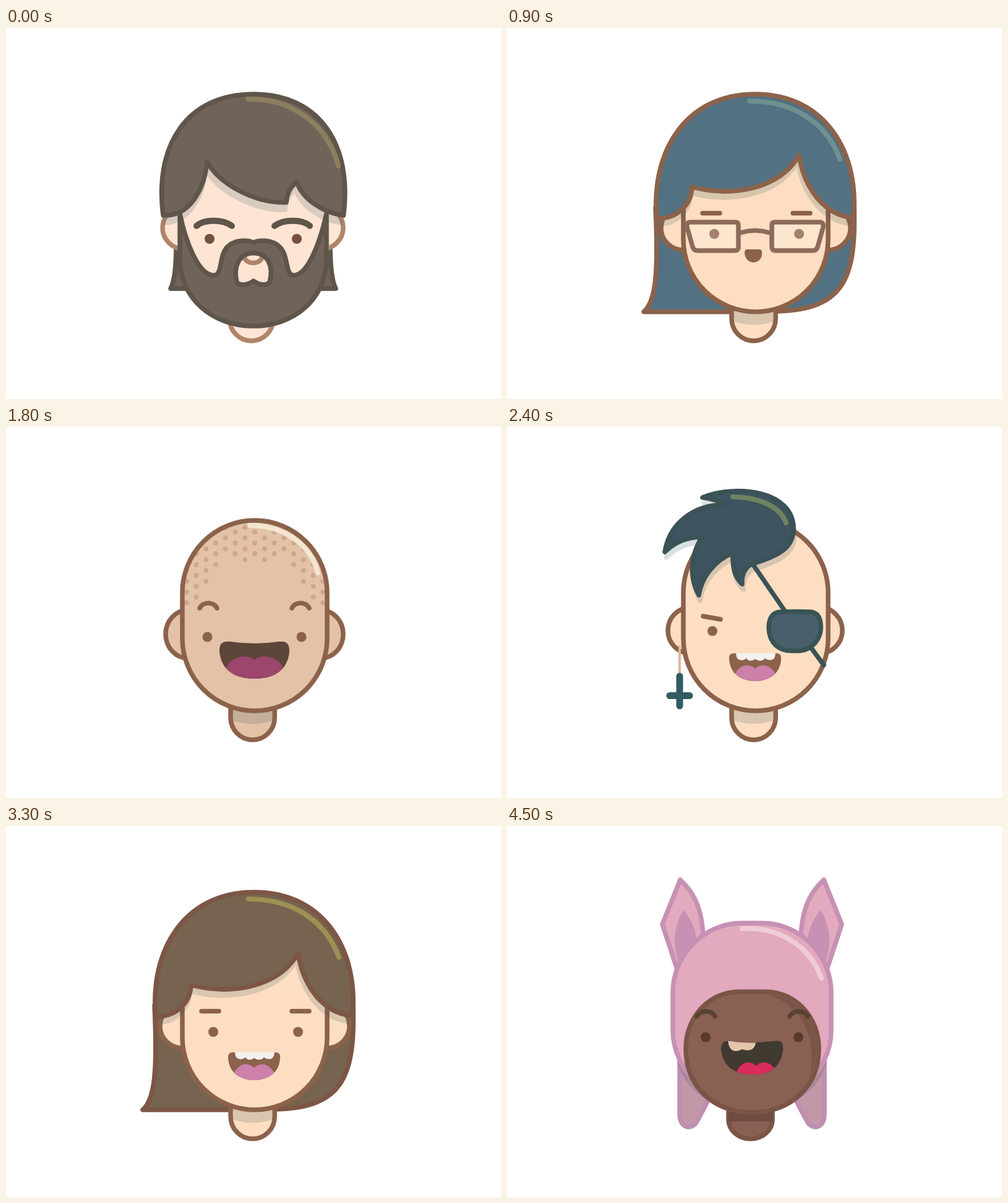
These frames come from a looping animation (800x600 px, 4800 ms). An HTML page:

```html
<!DOCTYPE html>
<html lang="en">
<head>
<meta charset="utf-8">
<title>Faces</title>
<style>
html, body { margin: 0; width: 100%; height: 100%; overflow: hidden; background: #fff; }
svg { display: block; width: 100%; height: 100%; }
</style>
</head>
<body>
<svg id="stage" viewBox="0 0 800 600" stroke-linecap="round" stroke-linejoin="round"></svg>
<script>
const STEP = 300, WEIGHT = 7.5;
const BROWN = '#8c624a', PINE = '#3a5355';

const path = (d, fill = 'none', line = 'none', w = WEIGHT) =>
  `<path d="${d}" fill="${fill}" stroke="${line}" stroke-width="${w}"/>`;
const line = (d, color, w = WEIGHT) => path(d, 'none', color, w);
const dot = (x, y, r, fill) => `<circle cx="${x}" cy="${y}" r="${r}" fill="${fill}"/>`;
const eyes = (x1, x2, y, fill = BROWN) => dot(x1, y, 8, fill) + dot(x2, y, 8, fill);
const move = (transform, art) => `<g transform="${transform}">${art}</g>`;
const clip = (id, art) => `<g clip-path="url(#${id})">${art}</g>`;
const both = (axis, art) => art + move(`matrix(-1 0 0 1 ${2 * axis} 0)`, art);
const shade = (d, x = 0, y = 0, w = 0) =>
  `<path d="${d}" transform="translate(${x} ${y})" fill="#345a5c" stroke="#345a5c" stroke-width="${w}" opacity=".18"/>`;

const HEAD = 'M285 268A117 117 0 0 1 519 268V342A117 117 0 0 1 285 342Z';
const PALE = { skin: '#fddec2', line: BROWN, ears: [256, 546, 288, 370] };
const TAN = { skin: '#e3c2a8', line: BROWN, ears: [254, 549, 292, 378] };
const ROSY = { skin: '#fee4d3', line: '#b08468', ears: [249, 549, 284, 362], neckX: -2 };

const earShapes = ([l, r, t, b]) => [l + 40, r - 40].map(x =>
  `<ellipse cx="${x}" cy="${(t + b) / 2}" rx="36" ry="${(b - t) / 2 - 4}"/>`).join('');

function base({ skin, line, ears, headX = 0, neckX = 0 }, outline = line) {
  return `<g fill="${skin}" stroke="${line}" stroke-width="${WEIGHT}">${earShapes(ears)}</g>` +
    move(`translate(${neckX})`, path('M363 450V470A35.600 36 0 0 0 434.200 470V450', skin, line) +
      shade('M366.700 452H430.500V475Q399 485 366.700 475Z')) +
    move(`translate(${headX})`, path(HEAD, skin, outline));
}

// Clips the hair shadow to the head and ears.
let clips = 0;
function onSkin({ ears }, art) {
  const id = 'skin' + clips++;
  return `<clipPath id="${id}"><path d="${HEAD}"/>${earShapes(ears)}</clipPath>` + clip(id, art);
}

function hair(face, style, { fill, line, shine }, transform = '') {
  return onSkin(face, move(transform, shade(style.d, -2, style.drop, WEIGHT))) +
    move(transform, path(style.d, fill, line) + path(style.shine, 'none', shine, 8));
}

const UMBER = { fill: '#70635a', line: '#5f554a', shine: '#8b7f5f' };
const BLUE = { fill: '#527182', line: BROWN, shine: '#6e9090' };
const SLATE = { fill: '#465e6b', line: PINE, shine: '#62796a' };
const OLIVE = { fill: '#766350', line: '#7d5645', shine: '#9c9152' };

const SHAG = {
  d: 'M254 303C239 190 292 107 400 107C508 107 560 190 545.500 303C515 299 480 279 470 249C459 257 454 268 453 282C405 284 345 254 325 216C320 265 295 305 254 303Z',
  shine: 'M391 115C460 113 520 155 537 223', drop: 12
};
const BOB = {
  d: 'M242 308C232 205 285 107 401 107C517 107 570 205 560 307C512 303 480 258 472 206C440 262 360 274 299 257C298 286 275 309 242 308Z',
  shine: 'M392 118C460 118 515 150 538 212', drop: 10
};
const QUIFF = {
  d: 'M299 160C305 125 345 107 400 107C480 107 519 130 519 190C519 240 520 270 544 282C510 292 460 285 428 257C423 268 421 278 425 288C375 290 320 275 289 250C262 230 262 166 299 160Z',
  shine: 'M390 115C470 115 510 130 510 197', drop: 11
};
const BOB_BACK = 'M240 290C245 400 240 442 221 459H400L440 458C540 454 565 410 561 290Z';
const LONG = 'M237 250C237 169 302 103 382 103H408C488 103 553 169 553 250C553 350 555 420 573 459';

const mouths = `<clipPath id="grin"><path d="M345 364C345 352 347 346 362 347Q402 353 441 347C456 346 458 352 458 364C455 392 435 407 402 407C368 407 348 392 345 364Z"/></clipPath>
<clipPath id="bite"><path d="M359 373Q359 366 367 366H435Q443 366 443 373C443 400 422 411 401 411C380 411 359 400 359 373Z"/></clipPath>
<clipPath id="gap"><path d="M346 362C346 350 350 347 362 348C390 353 415 349 432 348C444 346 447 352 446 362C443 390 425 402 397 402C370 402 349 390 346 362Z"/></clipPath>
<clipPath id="skull"><path d="${HEAD}"/></clipPath>`;

const tongue = (x1, x2, y, fill) => {
  const m = (x1 + x2) / 2;
  return path(`M${x1} ${y}C${x1 + 8} ${y - 22} ${m - 10} ${y - 24} ${m} ${y - 14}C${m + 10} ${y - 24} ${x2 - 8} ${y - 22} ${x2} ${y}V415H${x1}Z`, fill);
};
const fillMouth = fill => `<rect x="340" y="340" width="125" height="75" fill="${fill}"/>`;

const laugh = () => clip('grin', fillMouth('#5e453a') + tongue(355, 448, 391, '#9c456d'));
const bite = () => clip('bite', fillMouth(BROWN) + tongue(366, 436, 405, '#cd80aa') +
  path('M370 364H434Q434 377 426 377Q420 377 417 374Q414 378 409 378Q404 378 401.500 375Q398 378 394 378Q389 378 387 374Q383 378 378 377Q370 377 370 364Z', '#f4f1f0'));
const smile = () => line('M373 381C376 399 415 399 418 381', BROWN);
const pout = () => path('M384 363Q384 358 389 358H407Q412 358 412 363C413 372 407 379 398 379C390 379 384 372 384 363Z', BROWN);
const arches = () => line('M313 293C318 282 336 282 341 293M462 293C467 282 485 282 490 293', BROWN);
const dashes = () => line('M316 299.500H344M462 299.500H490', BROWN);

function moustache({ fill, line }) {
  const d = 'M399 388C385 402 345 400 321 377C350 380 355 358 380 358C393 358 400 370 399 388Z';
  return both(398.5, shade(d, 0, 7, WEIGHT)) + both(398.5, path(d, fill, line));
}

const boxGlasses = () => both(401, path('M296 314H369Q374 314 374 319V354Q374 360 368 360H308Q302 360 300 354L291 322Q290 314 296 314Z', 'rgba(255,255,255,.2)', '#8c6a5c')) +
  line('M378 331Q401 324 424 331', '#8c6a5c');

function roundGlasses() {
  const lens = 'M289 330C289 318 300 314 330 314C360 314 374 320 373 335C370 360 352 382 318 382C292 382 289 355 289 330Z';
  const half = 'M397 317C375 317 365 307 335 305Q300 303 267 311V322Q274 326 275 332C278 360 284 390 324 391C359 391 371 375 381 350C386 335 389 331 397 331Z';
  return both(397, path(lens, 'rgba(255,255,255,.2)') +
    `<path d="${half}${lens}" fill="#3d464a" fill-rule="evenodd"/>` +
    '<ellipse cx="276" cy="318" rx="5.500" ry="2" fill="#f4f4f4"/>');
}

function bearded() {
  const { fill, line: dark } = UMBER;
  const hole = 'M373 411C367 385 377 364 400 364C423 364 433 385 426 411C421 418 408 415 400 409C392 415 378 418 373 411Z';
  return both(399.5, path('M275 350C275 390 272 410 266 421.500H310V350Z', fill, dark)) +
    base(ROSY, ROSY.skin) +
    path('M281 300V370C281 440 335 482 400 482C465 482 518 440 518 370V300C508 345 488 400 465 400C450 400 458 365 440 352C430 343 410 342 400 347C390 342 370 343 360 352C343 365 351 400 336 400C311 400 290 345 281 300Z', fill, dark) +
    path(hole, ROSY.skin) + line('M385 371A15 12 0 0 0 414 371', ROSY.line) + line(hole, dark) +
    hair(ROSY, SHAG, UMBER) +
    line('M308 320C320 309 350 309 365 320M434 320C449 309 479 309 491 320', dark, 10) +
    eyes(329, 470, 341, '#75503e');
}

function bobbed(tone, colors, transform, features) {
  const face = { ...tone, ears: [245, 559, 284, 363] };
  return move(transform, path(BOB_BACK, colors.fill, colors.line)) + base(face) +
    hair(face, BOB, colors, transform) + features;
}

function shaved() {
  const last = [2, 3, 2, 2, 3, 5, 6, 7];
  let stubble = '';
  for (let k = -7; k <= 7; k++)
    for (let n = 0; n <= last[Math.abs(k)]; n++)
      stubble += dot(402 + 15.75 * k, (k % 2 ? 162 : 170) + 17.5 * n, 4, '#cfa78f');
  return base(TAN, 'none') + clip('skull', stubble) + line(HEAD, BROWN) +
    line('M394 159C450 160 493 190 504 236', '#f3e6d0', 8) +
    arches() + eyes(325.5, 477.5, 339.5) + laugh();
}

function pirate() {
  const locks = 'M316 114C370 92 464 103 463 165C463 195 440 208 398 221C384 226 379 240 380 254C370 245 364 232 365 204C335 215 314 245 310 272C298 250 292 215 315 178C290 178 272 186 255 202C262 158 300 125 352 126Q336 116 316 114Z';
  return base(PALE) + shade(locks, 2, 9, WEIGHT) +
    line('M398 223L448 296M490 355L512 385', PINE) +
    path(locks, '#3e5460', '#3b5256') +
    line('M365 113C400 113 440 125 451 155', '#6f835f', 8) +
    path('M443 299Q467 298 490 299C503 300 508 310 507 328C504 352 485 362 470 362H460C440 362 424 350 423 325C423 308 430 299 443 299Z', '#485f6c', PINE) +
    line('M317 306L345 311', BROWN) + dot(332, 330, 8, BROWN) + bite() +
    line('M279 355V400', '#e0b79a', 4) + line('M279 403V451M263 434.500H295', '#315c60', 11);
}

function fringed() {
  const face = { ...PALE, ears: [285, 505, 300, 350], headX: -5, neckX: -1 };
  return path(LONG + 'H218C235 420 237 350 237 250Z', '#3a5252', PINE) + base(face) +
    shade('M288 264H502.500V278H288Z') +
    path(LONG + 'C535 445 512 390 509 330L502.500 264H288L283 330C278 395 258 445 218 459C235 420 237 350 237 250Z', SLATE.fill, PINE) +
    line('M387 115C455 113 515 150 535 207', SLATE.shine, 8) +
    line('M307 291C314 282 325 280 335 284M457 284C467 280 477 282 484 291', BROWN) +
    eyes(335.5, 455.5, 341) + smile() + roundGlasses();
}

function dapper() {
  const face = { ...TAN, ears: [247, 555, 292, 377] };
  return base(face) + hair(face, QUIFF, OLIVE) +
    line('M310 326H362M440 326H491', BROWN) + eyes(325.5, 476.5, 338) +
    moustache(OLIVE) + line('M386 405C390 416 409 416 414 405', BROWN);
}

function hooded() {
  const pink = '#e3a9be', rim = '#c791b4', skin = '#8a6053', edge = '#7a5545';
  return both(396, path('M280 87C305 110 317 140 317 185L276 235L251 159Z', pink, rim) +
      path('M285 136C301 155 308 175 307 200L278 222C268 195 268 165 285 136Z', rim) +
      path('M279 370V466C279 490 300 493 308 476L335 425Z', '#c298a9', '#c08fb0') +
      path('M275 382C284 412 302 432 328 446L340 420Z', '#a9889a')) +
    path('M358 455V475A35.500 31 0 0 0 429 475V455Z', skin, edge) +
    path('M358 458H429V478H358Z', '#704c3f') +
    path('M268 270C268 208 318 157 380 157H412C474 157 524 208 524 270V330C524 400 460 448 396 448C332 448 268 400 268 330Z', pink, rim) +
    path('M289 360C289 309 327 268 375 268H418C466 268 504 309 504 360C504 420 460 463 396 463C332 463 289 420 289 360Z', skin, edge) +
    path('M418 272C466 274 500 313 500 360Q500 380 491 400C500 330 470 285 418 272Z', '#7a5448') +
    line('M380 166C440 162 490 195 508 246', '#efcbd8', 8) +
    line('M307 308C312 297 331 297 336 308M457 308C462 297 481 297 486 308', '#57442f') +
    eyes(321, 471, 341.5, '#593a2d') +
    clip('gap', fillMouth('#403a30') + tongue(369, 437, 402, '#da2d5d') +
      path('M357 345H402C403 360 394 366 380 361C367 368 358 363 357 345Z', '#e6c6ab'));
}

function afro(tone, colors, x, y, r, features) {
  return `<circle cx="${x}" cy="${y}" r="${r}" fill="${colors.fill}" stroke="${colors.line}" stroke-width="${WEIGHT}"/>` +
    base(tone) + features;
}

function plain(face, style, colors, transform, features) {
  return base(face) + hair(face, style, colors, transform) + features;
}

const bunned = features => path('M363 94A37.500 38 0 0 1 438 94A37.500 38 0 0 1 363 94Z', OLIVE.fill, OLIVE.line) +
  plain(PALE, BOB, OLIVE, '', features);

const stern = line('M310 326H362M440 326H491', BROWN) + eyes(325.5, 476.5, 338);
const merry = arches() + eyes(325.5, 477.5, 339.5);
const calm = dashes() + eyes(335, 472, 333);
const wide = { ...PALE, ears: [247, 555, 292, 377] };

const faces = [
  bearded(),
  plain(PALE, SHAG, OLIVE, 'matrix(-1 0 0 1 796 0)', stern + smile()),
  plain({ ...TAN, ears: [254, 548, 292, 378] }, QUIFF, UMBER, '', stern + pout()),
  bobbed(PALE, BLUE, '', calm + boxGlasses() + pout()),
  afro(TAN, UMBER, 400.5, 265, 182, merry + laugh()),
  bunned(calm + smile()),
  shaved(),
  plain(wide, QUIFF, UMBER, 'matrix(-1 0 0 1 804 0)', merry + bite()),
  pirate(),
  afro(PALE, OLIVE, 401, 276, 196, calm + smile()),
  fringed(),
  bobbed(PALE, OLIVE, '', calm + bite()),
  bobbed(TAN, UMBER, 'matrix(1.04 0 0 1 -20.700 0)', calm + smile()),
  dapper(),
  bobbed(PALE, SLATE, 'matrix(-1 0 0 1 793 0)', calm + pout()),
  hooded()
];

const stage = document.getElementById('stage');
stage.innerHTML = `<defs>${mouths}</defs>` + faces.map(f => `<g class="face" display="none">${f}</g>`).join('');
const groups = stage.querySelectorAll('.face');
const start = performance.now();
let shown = -1;

function draw() {
  const now = Math.floor((performance.now() - start) / STEP) % groups.length;
  if (now !== shown) {
    groups.forEach((g, i) => g.setAttribute('display', i === now ? 'inline' : 'none'));
    shown = now;
  }
  requestAnimationFrame(draw);
}
draw();
</script>
</body>
</html>
```
